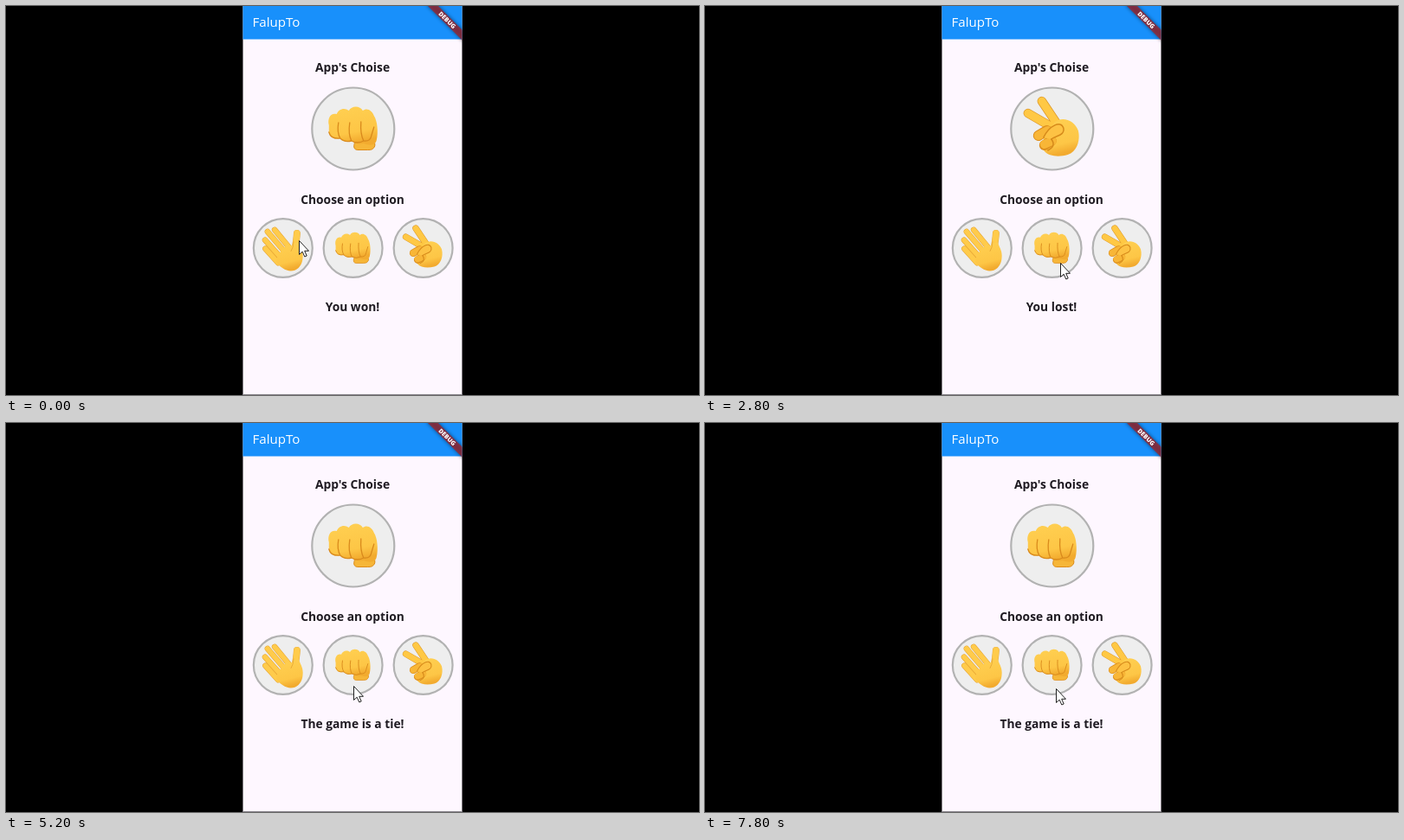
Recreate the animation shown at these times as an HTML page. Size 800 px wide and 450 px high, loop 8000 ms.

```html
<!DOCTYPE html>
<html lang="en">
<head>
<meta charset="utf-8">
<title>Hand game</title>
<style>
html, body { margin: 0; width: 100%; height: 100%; overflow: hidden; background: #000; }
svg { display: block; width: 800px; height: 450px; }
text { font-family: "Open Sans", "Noto Sans", sans-serif; }
.label { font-size: 13.8px; font-weight: 700; fill: #1f1b22; text-anchor: middle; }
.show { visibility: hidden; animation: 8s step-end infinite; }
.fist { animation-name: fist; }
.palm { animation-name: palm; }
.vee { animation-name: vee; }
.won { animation-name: won; }
.tie { animation-name: tie; }
.lost { animation-name: lost; }
#cursor { animation: move 8s infinite; }

@keyframes fist {
  0%, 37.5%, 90%, 100% { visibility: visible; }
  6.25%, 23.75%, 73.75% { visibility: hidden; }
}
@keyframes palm {
  0%, 23.75%, 90%, 100% { visibility: hidden; }
  6.25%, 73.75% { visibility: visible; }
}
@keyframes vee {
  0%, 37.5%, 100% { visibility: hidden; }
  23.75% { visibility: visible; }
}
@keyframes won {
  0% { visibility: visible; }
  6.25%, 100% { visibility: hidden; }
}
@keyframes tie {
  0%, 23.75%, 73.75% { visibility: hidden; }
  6.25%, 37.5%, 90%, 100% { visibility: visible; }
}
@keyframes lost {
  0%, 37.5%, 90%, 100% { visibility: hidden; }
  23.75%, 73.75% { visibility: visible; }
}
/* the pointer advances every 100 ms */
@keyframes move {
  0% { transform: translate(338px, 271px); animation-timing-function: steps(4); }
  5% { transform: translate(328px, 284px); animation-timing-function: steps(2); }
  7.5% { transform: translate(330px, 280px); animation-timing-function: steps(3); }
  11.25% { transform: translate(348px, 236px); animation-timing-function: steps(2); }
  13.75% { transform: translate(362px, 185px); animation-timing-function: steps(4); }
  18.75%, 21.25% { transform: translate(318px, 288px); animation-timing-function: steps(3); }
  25% { transform: translate(322px, 284px); animation-timing-function: steps(3); }
  28.75% { transform: translate(350px, 340px); animation-timing-function: steps(3); }
  32.5% { transform: translate(400px, 305px); animation-timing-function: steps(2); }
  35% { transform: translate(410px, 297px); animation-timing-function: steps(3); }
  38.75% { transform: translate(410px, 292px); animation-timing-function: steps(4); }
  43.75% { transform: translate(432px, 380px); animation-timing-function: steps(2); }
  46.25% { transform: translate(428px, 362px); animation-timing-function: steps(3); }
  50% { transform: translate(415px, 261px); animation-timing-function: steps(4); }
  55% { transform: translate(408px, 300px); animation-timing-function: steps(8); }
  65% { transform: translate(401px, 304px); animation-timing-function: steps(1); }
  66.25% { transform: translate(396px, 282px); animation-timing-function: steps(2); }
  68.75%, 71.25% { transform: translate(402px, 270px); animation-timing-function: steps(2); }
  73.75% { transform: translate(402px, 272px); animation-timing-function: steps(3); }
  77.5% { transform: translate(443px, 189px); animation-timing-function: steps(4); }
  82.5% { transform: translate(425px, 376px); animation-timing-function: steps(2); }
  85% { transform: translate(416px, 384px); animation-timing-function: steps(4); }
  90% { transform: translate(404px, 292px); animation-timing-function: steps(3); }
  93.75% { transform: translate(412px, 345px); animation-timing-function: steps(1); }
  95% { transform: translate(411px, 336px); animation-timing-function: steps(2); }
  97.5%, 100% { transform: translate(405px, 307px); }
}
</style>
</head>
<body>
<svg viewBox="0 0 800 450">
  <defs>
    <linearGradient id="skin" x1="0" y1="0" x2=".25" y2="1">
      <stop offset="0" stop-color="#ffd052"/>
      <stop offset=".75" stop-color="#fdc646"/>
      <stop offset="1" stop-color="#f2ab2f"/>
    </linearGradient>
    <filter id="soft" x="-20%" y="-150%" width="140%" height="400%"><feGaussianBlur stdDeviation="2"/></filter>
    <clipPath id="screen"><path d="M273.500 0H526.500V450H273.500Z"/></clipPath>

    <circle id="disc" r="47.5" fill="#eee" stroke="#b2b2b2" stroke-width="2.2" vector-effect="non-scaling-stroke"/>

    <g id="fist" stroke-linecap="round" stroke-linejoin="round">
      <path d="M2 16H23Q26 16 25 20Q23 25 17 24.500H5Q0 24 1 19Z" fill="#f6b638" stroke="#dd8c1b"/>
      <path d="M-28-4C-30-12-26-19-19-17C-17-23-10-25-5-21C-2-27 8-27 11-21C16-25 22-21 24-15C28-9 29 4 27 13C26 19 20 20 12 17C8 18 2 17-2 14C-6 16-12 15-15 11C-22 13-27 10-28 3Z" fill="url(#skin)"/>
      <path d="M-17-7Q-19 4-15 11M-4-7Q-6 6-2 14M9-8Q8 6 12 14M-28 4Q-26 12-15 11Q-10 16-2 14Q5 18 12 14Q20 15 21 8L24-2" fill="none" stroke="#d98a1c" stroke-width="1.300"/>
    </g>

    <path id="digits" d="M-13.500-29.500L10-1M-25-26.500L1 4M-29-13L-5 14M-28.500 1L-8 24"/>
    <path id="thumb" d="M22.500-24Q22-14 19 2"/>
    <g id="palm" stroke-linecap="round" stroke-linejoin="round" fill="none">
      <g stroke="#e6a535">
        <use href="#digits" stroke-width="9.200"/>
        <use href="#thumb" stroke-width="11"/>
      </g>
      <g stroke="#ffcb4b">
        <use href="#digits" stroke-width="7.800"/>
        <use href="#thumb" stroke-width="9.800"/>
      </g>
      <path d="M7-6Q14 0 16-8L26-8C27-3 32 3 32 12C32 21 30 27 25 32C18 39 7 38 0 33C-6 29-9 26-11 22L-8 10Z" fill="url(#skin)"/>
      <path d="M17-10Q17-1 13 5" stroke="#e6a535" stroke-width="1.200"/>
    </g>

    <g id="vee" stroke-linecap="round" stroke-linejoin="round" fill="none">
      <path d="M-12-32L8-2M-28-18L3 0" stroke="#dc972a" stroke-width="10.400"/>
      <path d="M-12-32L8-2M-28-18L3 0" stroke="#ffc844" stroke-width="9"/>
      <path d="M3-8C13-15 26-9 30 2C33 14 28 27 18 30C8 33-4 32-9 26C-13 21-11 10-5 4Z" fill="url(#skin)"/>
      <path d="M-16 8L-6 2M-9 19L-1 14" stroke="#dd8f1e" stroke-width="12"/>
      <path d="M-16 8L-5 2M-9 18L0 14" stroke="#f8b637" stroke-width="10"/>
      <path d="M-10 10C-3-4 10-10 13-1C15 8 4 8-1 12" fill="#fdc244" stroke="#d68a1b" stroke-width="1.500"/>
      <path d="M-1 12Q5 20-5 25" stroke="#d68a1b" stroke-width="1.500"/>
    </g>
  </defs>

  <g clip-path="url(#screen)">
    <path d="M273 0H527V450H273Z" fill="#fef7ff"/>
    <path d="M273 449.500H527" stroke="#8e8a91"/>
    <path d="M273 0H527V38.500H273Z" fill="#1890fb"/>
    <text x="284.500" y="24" font-size="15.1" fill="#fff">FalupTo</text>
    <g transform="translate(527 0) rotate(45)">
      <path d="M-30 19.800H30V28.300H-30Z" fill="#000" opacity=".5" filter="url(#soft)"/>
      <path d="M-30 19.800H30V28.300H-30Z" fill="#a0232b" opacity=".76"/>
      <text x="-1" y="26.600" font-size="7.1" font-weight="800" fill="#fff" text-anchor="middle">DEBUG</text>
    </g>
  </g>

  <g class="label">
    <text x="400" y="76">App's Choise</text>
    <text x="400" y="229">Choose an option</text>
    <text x="400" y="353" class="show won">You won!</text>
    <text x="400" y="353" class="show tie">The game is a tie!</text>
    <text x="400" y="353" class="show lost">You lost!</text>
  </g>

  <g transform="translate(400.800 142)">
    <use href="#disc"/>
    <use href="#fist" class="show fist"/>
    <use href="#palm" class="show palm"/>
    <use href="#vee" class="show vee"/>
  </g>
  <g transform="translate(319.800 280) scale(.715)"><use href="#disc"/><use href="#palm"/></g>
  <g transform="translate(400.600 280) scale(.715)"><use href="#disc"/><use href="#fist"/></g>
  <g transform="translate(481.600 280) scale(.715)"><use href="#disc"/><use href="#vee"/></g>

  <path id="cursor" d="M.5.500V16.500L4.200 13.200 6.800 19 9.200 18 6.700 12.300H11.500Z" fill="#fff" stroke="#222" stroke-linejoin="round"/>
</svg>
</body>
</html>
```
